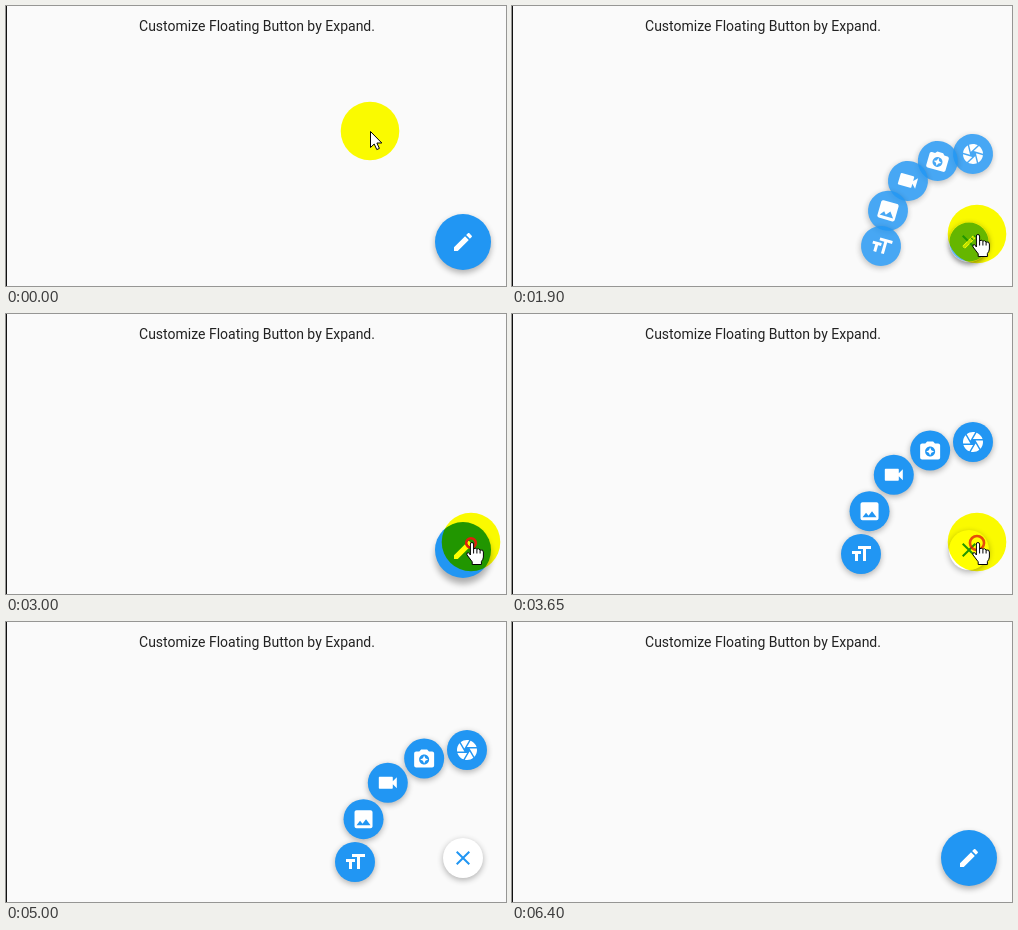
An HTML page that plays this animation: 500x280 px, repeating every 6550 ms.

```html
<!DOCTYPE html>
<html lang="en">
<head>
<meta charset="utf-8">
<title>Expanding floating button</title>
<style>
  html, body { margin: 0; width: 100%; height: 100%; overflow: hidden; background: #fafafa; }
  svg { display: block; width: 500px; height: 280px; }
  text { font: 14px Roboto, sans-serif; fill: #222; }
  #highlight { mix-blend-mode: multiply; }
</style>
</head>
<body>
<svg viewBox="0 0 500 280">
  <defs>
    <filter id="blur" x="-50%" y="-50%" width="200%" height="200%"><feGaussianBlur stdDeviation="3"/></filter>
  </defs>
  <rect width="500" height="280" fill="#fafafa"/>
  <rect width="1" height="280" fill="#111"/>
  <text x="251" y="25" text-anchor="middle">Customize Floating Button by Expand.</text>
  <g id="buttons"></g>
  <circle id="highlight" r="29.3" fill="#ffff00"/>
  <circle id="ring" cy="1" fill="none" stroke="#e0200c" stroke-width="2.6"/>
  <g id="pointer" stroke="#000" fill="#fff" stroke-linejoin="round">
    <path id="arrow" d="M.5 .5V16.5L4.2 13L6.8 18.6L9.4 17.4L6.9 12H11.8Z"/>
    <g id="hand" transform="translate(.9 0)">
      <path d="M-1.5 13V2Q-1.5 .5 0 .5T1.7 2V7Q3.2 5.2 5 7.2Q6.7 5.9 8.2 8Q11.3 7.2 11.5 10V15Q11.3 17.5 9.5 19.5V22.5H.3V19.8L-5 12.8Q-5.4 10.2-3.4 10.6Z"/>
      <path d="M1.7 7V11.5M5 7.5V11.5M8.2 8V11.5" fill="none"/>
    </g>
  </g>
</svg>
<script>
const LOOP = 6550, STEP = 50, DURATION = 250, RELEASE = 165;
const BLUE = '#2196f3';
const FAB = { x: 457, y: 236 }, HUB = { x: 461, y: 240 }, REACH = 112;
const CLICKS = [1600, 2350, 3000, 3600, 4350, 5650];

// Pointer path: time, x, y
const PATH = [
  [400, 364, 125], [850, 452, 211], [1100, 461.5, 215.5], [1350, 465, 228],
  [4750, 465, 228], [5000, 545, 262], [5450, 545, 262], [5650, 465, 228],
  [6100, 465, 228], [6350, 545, 262]
];

const blade = 'M9.4 10.5l4.77-8.26C13.47 2.09 12.75 2 12 2c-2.4 0-4.6.85-6.32 2.25l3.66 6.35.06-.1z';
const glyph = d => `<path d="${d}"/>`;
const ICONS = {
  edit: glyph('M3 17.25V21h3.75L17.81 9.94l-3.75-3.75L3 17.25zM20.71 7.04c.39-.39.39-1.02 0-1.41l-2.34-2.34c-.39-.39-1.02-.39-1.41 0l-1.83 1.83 3.75 3.75 1.83-1.83z'),
  close: glyph('M19 6.41L17.59 5 12 10.59 6.41 5 5 6.41 10.59 12 5 17.59 6.41 19 12 13.41 17.59 19 19 17.59 13.41 12z'),
  aperture: [0, 60, 120, 180, 240, 300].map(a => `<path transform="rotate(${a} 12 12)" d="${blade}"/>`).join(''),
  camera: glyph('M9 3L7.17 5H4c-1.1 0-2 .9-2 2v12c0 1.1.9 2 2 2h16c1.1 0 2-.9 2-2V7c0-1.1-.9-2-2-2h-3.17L15 3H9zm3 15c-2.76 0-5-2.24-5-5s2.24-5 5-5 5 2.24 5 5-2.24 5-5 5z')
    + glyph('M12 17l1.25-2.75L16 13l-2.75-1.25L12 9l-1.25 2.75L8 13l2.75 1.25z'),
  video: glyph('M17 10.5V7c0-.55-.45-1-1-1H4c-.55 0-1 .45-1 1v10c0 .55.45 1 1 1h12c.55 0 1-.45 1-1v-3.5l4 4v-11l-4 4z'),
  image: glyph('M21 19V5c0-1.1-.9-2-2-2H5c-1.1 0-2 .9-2 2v14c0 1.1.9 2 2 2h14c1.1 0 2-.9 2-2zM8.5 13.5l2.5 3.01L14.5 12l4.5 6H5l3.5-4.5z'),
  size: glyph('M9 4v3h5v12h3V7h5V4H9zm-6 8h3v7h3v-7h3V9H3v3z')
};

const $ = id => document.getElementById(id);
const clamp = v => Math.min(1, Math.max(0, v));
const mix = (a, b, u) => a + (b - a) * u;
const interval = (u, from, to) => clamp((u - from) / (to - from));

function bezier(x1, y1, x2, y2) {
  const at = (a, b, s) => 3 * a * s * (1 - s) ** 2 + 3 * b * s * s * (1 - s) + s ** 3;
  return x => {
    let lo = 0, hi = 1;
    for (let i = 0; i < 24; i++) {
      const mid = (lo + hi) / 2;
      if (at(x1, x2, mid) < x) lo = mid; else hi = mid;
    }
    return x <= 0 ? 0 : x >= 1 ? 1 : at(y1, y2, lo);
  };
}
const fastOutSlowIn = bezier(.4, 0, .2, 1);
const easeOutQuad = bezier(.25, .46, .45, .94);
const easeOut = bezier(0, 0, .58, 1);
const easeInOut = bezier(.42, 0, .58, 1);

function addButton(icon, radius, fill, ink, lift) {
  const g = document.createElementNS('http://www.w3.org/2000/svg', 'g');
  g.innerHTML = `<circle r="${radius}" cy="${lift}" opacity=".3" filter="url(#blur)"/>
    <circle r="${radius}" fill="${fill}"/>
    <g fill="${ink}" transform="translate(-12 -12)">${ICONS[icon]}</g>`;
  $('buttons').append(g);
  return { root: g, shadow: g.firstChild };
}
const place = (el, x, y, extra = '') => el.setAttribute('transform', `translate(${x} ${y}) ${extra}`);

const closer = addButton('close', 20, '#fff', BLUE, 2);
place(closer.root, FAB.x, FAB.y);
const items = ['aperture', 'camera', 'video', 'image', 'size'].map(n => addButton(n, 20, BLUE, '#fff', 2));
const fab = addButton('edit', 28, BLUE, '#fff', 3);

function pointerAt(t) {
  const next = PATH.findIndex(p => p[0] > t);
  if (next === 0) return PATH[0].slice(1);
  if (next < 0) return PATH[PATH.length - 1].slice(1);
  const a = PATH[next - 1], b = PATH[next];
  const u = easeInOut((t - a[0]) / (b[0] - a[0]));
  return [mix(a[1], b[1], u), mix(a[2], b[2], u)];
}

function drawButtons(t, hover, pressed) {
  const count = CLICKS.filter(c => c + RELEASE <= t).length;
  const open = count % 2 === 1;
  const u = count ? clamp((t - CLICKS[count - 1] - RELEASE) / DURATION) : 1;
  const spread = open ? fastOutSlowIn(u) : easeOutQuad(1 - u);
  const toward = (from, to, k) => open ? mix(from, to, k) : mix(to, from, k);

  items.forEach((item, i) => {
    const angle = Math.PI / 2 + i * Math.PI / 8;
    place(item.root, HUB.x + Math.cos(angle) * REACH * spread, HUB.y - Math.sin(angle) * REACH * spread,
      `rotate(${(1 - spread) * 90})`);
    item.root.setAttribute('opacity', spread);
  });

  place(fab.root, FAB.x, FAB.y, `scale(${toward(1, .7, easeOut(interval(u, 0, .5)))})`);
  fab.root.setAttribute('opacity', toward(1, 0, easeInOut(interval(u, .25, 1))));
  fab.shadow.setAttribute('cy', pressed ? 6 : hover ? 4 : 3);
}

function render(time) {
  const t = Math.floor(time % LOOP / STEP) * STEP;
  const [x, y] = pointerAt(t);
  const hover = Math.hypot(x - FAB.x, y - FAB.y) < 28;
  const click = CLICKS.find(c => t >= c && t < c + 250);
  const pressed = click !== undefined;

  drawButtons(t, hover, pressed);
  for (const id of ['highlight', 'pointer', 'ring']) place($(id), x, y);
  $('arrow').style.display = hover ? 'none' : '';
  $('hand').style.display = hover ? '' : 'none';

  const age = pressed ? (t - click) / 250 : 1;
  $('ring').setAttribute('r', mix(4.8, 16, age));
  $('ring').setAttribute('opacity', 1 - age);
}

const start = performance.now();
function tick() {
  render(performance.now() - start);
  requestAnimationFrame(tick);
}
tick();
</script>
</body>
</html>
```
